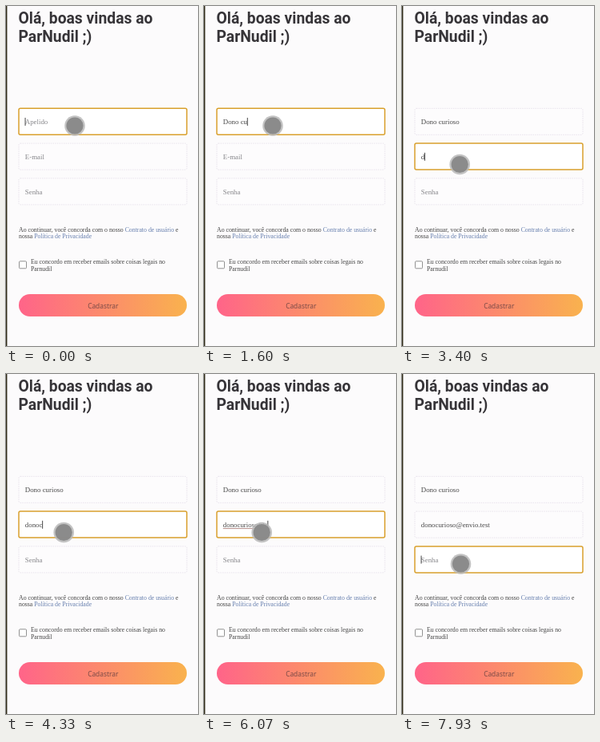
Write an HTML page that moves like this. It is 240 px wide and 426 px high and loops after 8000 ms.

```html
<!DOCTYPE html>
<html lang="pt-BR">
<head>
<meta charset="utf-8">
<title>Cadastro</title>
<style>
  html, body { margin: 0; width: 100%; height: 100%; overflow: hidden; background: #fcfbfc; }
  svg { display: block; width: 100%; height: 100%; }
  text { white-space: pre; }
  .title { font: 700 19.3px Roboto, sans-serif; fill: #363438; }
  .input { font: 8.85px "Liberation Serif", serif; }
  .small { font: 7.8px "Liberation Serif", serif; fill: #444; }
  .link { fill: #667fae; }
  .label { font: 8.4px "Noto Sans", sans-serif; fill: #7b4b48; text-anchor: middle; }
</style>
</head>
<body>
<svg viewBox="0 0 240 426">
  <defs>
    <linearGradient id="warm">
      <stop offset="0" stop-color="#ff6489"/>
      <stop offset="1" stop-color="#f9b24e"/>
    </linearGradient>
  </defs>
  <rect width="240" height="426" fill="#fcfbfc"/>
  <rect width="1.4" height="426" fill="#2d2a16"/>
  <g class="title">
    <text x="15.5" y="21.5">Olá, boas vindas ao</text>
    <text x="15.5" y="45">ParNudil ;)</text>
  </g>
  <g id="fields"></g>
  <g class="small">
    <text x="16" y="282.5">Ao continuar, você concorda com o nosso <tspan class="link">Contrato de usuário</tspan> e</text>
    <text x="16" y="291">nossa <tspan class="link">Política de Privacidade</tspan></text>
    <text x="31" y="323">Eu concordo em receber emails sobre coisas legais no</text>
    <text x="31" y="331.5">Parnudil</text>
  </g>
  <rect x="16.5" y="319.8" width="9" height="9" rx="1" fill="#fff" stroke="#858585" stroke-width=".9"/>
  <rect x="16" y="361" width="210" height="28" rx="14" fill="url(#warm)"/>
  <text class="label" x="121.3" y="378.6">Cadastrar</text>
  <rect id="caret" width=".9" height="10" fill="#333"/>
  <g id="pointer">
    <circle r="12.8" fill="#b9b9b9" opacity=".85"/>
    <circle r="10.6" fill="#858585" opacity=".9"/>
  </g>
</svg>
<script>
const LOOP = 8000;
const NS = 'http://www.w3.org/2000/svg';
const $ = id => document.getElementById(id);

function add(tag, attrs) {
  const el = document.createElementNS(NS, tag);
  for (const k in attrs) el.setAttribute(k, attrs[k]);
  return $('fields').appendChild(el);
}

// Key press times, evenly spaced between [time, count] marks.
function keyTimes(marks) {
  const times = [];
  for (let i = 1; i < marks.length; i++) {
    const [t0, n0] = marks[i - 1], [t1, n1] = marks[i];
    for (let n = n0 + 1; n <= n1; n++) times.push(t0 + (t1 - t0) * (n - n0) / (n1 - n0));
  }
  return times;
}

const fields = [
  { y: 128, hint: 'Apelido', value: 'Dono curioso', focus: 0,
    keys: keyTimes([[150, 0], [730, 4], [2230, 10], [2560, 12]]) },
  { y: 171.8, hint: 'E-mail', value: 'donocurioso@envio.test', focus: 3050,
    keys: keyTimes([[3050, 0], [3300, 1], [5130, 9], [6880, 17], [7280, 22]]) },
  { y: 215.6, hint: 'Senha', value: '', focus: 7650, keys: [] }
];

for (const f of fields) {
  f.box = add('rect', { x: 16, y: f.y + .3, width: 210, height: 33, rx: 2 });
  f.text = add('text', { class: 'input', x: 23.8, y: f.y + 20.2 });
}
const underline = add('path', { stroke: '#a0706c', 'stroke-width': .8, fill: 'none' });

const moves = [
  { at: 2680, end: 3000, from: [86, 150], to: [72.2, 198.5] },
  { at: 7330, end: 7620, from: [72.2, 198.5], to: [73.5, 238] }
];

function pointerAt(t) {
  let pos = moves[0].from;
  for (const m of moves) {
    if (t < m.at) break;
    const p = Math.min(1, (t - m.at) / (m.end - m.at));
    const e = p * p * (3 - 2 * p);
    pos = m.from.map((v, i) => v + (m.to[i] - v) * e);
  }
  return pos;
}

function setBox(box, focused) {
  box.setAttribute('fill', focused ? '#fff' : '#fdfcfd');
  box.setAttribute('stroke', focused ? '#d9a02c' : '#e2dce8');
  box.setAttribute('stroke-width', focused ? 1.5 : .8);
  box.setAttribute('stroke-dasharray', focused ? 'none' : '1.5 1.2');
}

function draw(t) {
  const active = fields.filter(f => f.focus <= t).pop();
  for (const f of fields) {
    const n = f.keys.filter(k => k <= t).length;
    f.count = n;
    f.text.textContent = n ? f.value.slice(0, n) : f.hint;
    f.text.setAttribute('fill', n ? '#484848' : '#858589');
    setBox(f.box, f === active);
  }

  const n = active.count;
  const width = n ? active.text.getComputedTextLength() : 0;
  const age = t - (n ? active.keys[n - 1] : active.focus);
  $('caret').setAttribute('x', 23.6 + width);
  $('caret').setAttribute('y', active.y + 12);
  $('caret').setAttribute('opacity', age % 1000 < 500 ? 1 : 0);

  const mail = fields[1];
  const marked = active === mail && mail.count > 11;
  const end = marked ? 23.8 + mail.text.getSubStringLength(0, 11) : 0;
  underline.setAttribute('d', marked ? `M23.8 ${mail.y + 21.8}H${end}` : '');

  $('pointer').setAttribute('transform', `translate(${pointerAt(t)})`);
}

const start = performance.now();
function tick() {
  draw((performance.now() - start) % LOOP);
  requestAnimationFrame(tick);
}
tick();
</script>
</body>
</html>
```
